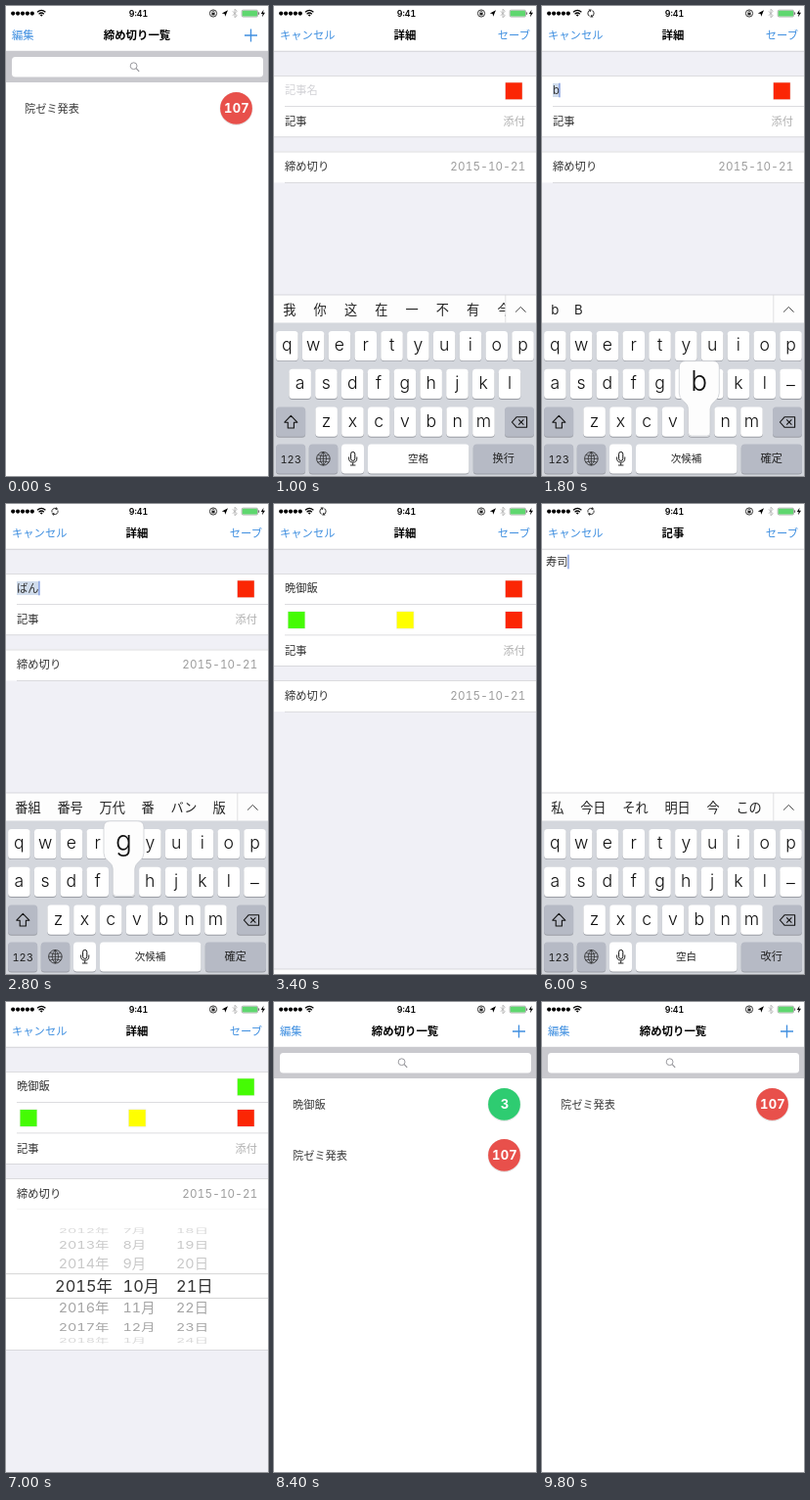
These frames come from a looping animation (268x480 px, 10000 ms). An HTML page:

```html
<!DOCTYPE html>
<html lang="ja">
<head>
<meta charset="utf-8">
<title>締め切り一覧</title>
<style>
  html, body { margin: 0; height: 100%; overflow: hidden; background: #fff; }
  svg { display: block; width: 100vw; height: 100vh; }
  svg svg { width: auto; height: auto; }
  text {
    font-family: Inter, "Noto Sans CJK JP", "Noto Sans CJK", sans-serif;
    font-variant-numeric: tabular-nums;
    white-space: pre;
  }
</style>
</head>
<body>
<svg id="stage" viewBox="0 0 268 480"></svg>
<script>
const LOOP = 10000, STEP = 200;
const BLUE = '#3f8fe0', LINE = '#d4d4d8', PAPER = '#f0f0f6', INK = '#333';
const RED = '#fb2604', GREEN = '#45fb04', YELLOW = '#ffff00';

// Drawing helpers
const text = (x, y, s, size = 11.3, fill = INK, more = '') =>
  `<text x="${x}" y="${y}" font-size="${size}" fill="${fill}" ${more}>${s}</text>`;
const MID = 'text-anchor="middle"', END = 'text-anchor="end"';
const BOLD = 'font-weight="700"', LIGHT = 'font-weight="300"';
const rect = (x, y, w, h, fill, r = 0) =>
  `<rect x="${x}" y="${y}" width="${w}" height="${h}" fill="${fill}" rx="${r}"/>`;
const circle = (x, y, r, fill, more = '') => `<circle cx="${x}" cy="${y}" r="${r}" fill="${fill}" ${more}/>`;
const stroke = (d, color, width = 1, more = '') =>
  `<path d="${d}" fill="none" stroke="${color}" stroke-width="${width}" ${more}/>`;
const fill = (d, color) => `<path d="${d}" fill="${color}"/>`;
const rule = (y, x = 0) => rect(x, y, 268 - x, 0.8, LINE);
const shift = (x, y, body) => `<g transform="translate(${x} ${y})">${body}</g>`;
const clip = (id, w, h, body) =>
  `<clipPath id="${id}">${rect(0, 0, w, h, '#000')}</clipPath><g clip-path="url(#${id})">${body}</g>`;

function statusBar(t) {
  let s = '';
  for (let i = 0; i < 5; i++) s += circle(7.2 + 4.9 * i, 7.6, 2.1, '#000');
  s += stroke('M32 6.3Q36.2 2.6 40.4 6.3M33.6 8.2Q36.2 5.8 38.8 8.2', '#000', 1.2);
  s += fill('M34.8 9.2Q36.2 8 37.6 9.2L36.2 10.8Z', '#000');
  if ((t >= 1200 && t < 6600) || (t >= 8800 && t < 9800)) {
    s += `<g transform="translate(50 7.5) rotate(${t / STEP * 45 + 90})">` +
      stroke('M-3 1A3.2 3.2 0 0 1 1.5-2.8M3-1A3.2 3.2 0 0 1-1.5 2.8', '#333') +
      fill('M1-4.5L3.4-2.3L.6-1.2ZM-1 4.5L-3.4 2.3L-.6 1.2Z', '#333') + '</g>';
  }
  s += text(135.5, 10.9, '9:41', 8.8, '#000', MID + ' font-weight="600"');
  s += circle(212, 7.5, 3.6, 'none', 'stroke="#222" stroke-width=".9"') + rect(210.4, 7, 3.2, 2.4, '#222');
  s += stroke('M211 7V6a1 1 0 0 1 2 0V7', '#222', 0.7);
  s += fill('M227 4.3L224.2 10.8L223.6 8L220.8 7.5Z', '#000');
  s += stroke('M231.8 5.3L236.2 9.8L234 11.8V3.2L236.2 5.3L231.8 9.8', '#aaa', 0.8);
  s += `<rect x="241.2" y="4.2" width="16.3" height="6.8" rx="1.3" fill="#fff" stroke="#777" stroke-width=".6"/>`;
  s += rect(241.7, 4.7, 15.3, 5.8, '#5fd76f', 0.8) + rect(258.2, 6.4, 0.9, 2.4, '#555');
  return s + fill('M263.5 3.8L260.8 8H262.6L262 11.3L265 6.8H263Z', '#000');
}

const navBar = (title, left, right) =>
  rect(0, 0, 268, 46, '#fff') + rect(0, 45.8, 268, 0.7, '#c6c6ca') +
  text(6, 34.4, left, 11.3, BLUE) + text(134, 34.4, title, 11.4, '#000', MID + ' ' + BOLD) +
  (right ? text(262, 34.4, right, 11.3, BLUE, END) : stroke('M244 30H257M250.5 23.5V36.5', BLUE, 1.3));

// List screen: each row can show a delete knob and slide aside
const OLD = { name: '院ゼミ発表', days: 107, color: '#e8504b' };
const NEW = { name: '晩御飯', days: 3, color: '#2ecc71' };

function listRow({ name, days, color }, y, editing, swipe) {
  const indent = editing ? 27 : 0;
  let s = text(19 + indent, 109, name, 11.2, '#3c3c3c') +
    circle(235.5, 105, 17, '#00000018') + circle(235.5, 104.4, 16.4, color) +
    text(236, 109.1, days, 13, '#fff', MID + ' letter-spacing=".3" ' + BOLD);
  if (editing) s += circle(18.5, 104.4, 8, '#ff3b30') + rect(14, 103.7, 9, 1.4, '#fff');
  if (swipe) s += rect(268, 78, 53, 52, '#ff3b30') + text(294.5, 108.5, '削除', 11.4, '#fff', MID);
  return shift(-swipe, y, s);
}

function list(items, { editing = false, swipe = 0, offset = 0 } = {}) {
  let s = rect(0, 0, 268, 480, '#fff');
  items.forEach((item, i) => { s += listRow(item, 52 * i + offset, editing, i ? 0 : swipe); });
  return s + navBar('締め切り一覧', editing ? '完了' : '編集') +
    rect(0, 46, 268, 32, '#c9c9ce') + rect(6, 52, 257, 20.4, '#fff', 3.5) +
    circle(130.6, 61.2, 3.4, 'none', 'stroke="#8e8e93" stroke-width=".9"') +
    stroke('M133.1 63.7L136.2 66.8', '#8e8e93', 1.1);
}

// Text with an inline conversion highlight and caret
const textWidth = (s, wide, narrow) => [...s].reduce((sum, c) => sum + (c <= 'z' ? narrow : wide), 0);

function field(x, y, value, composing, caret = true) {
  const w = textWidth(value, 11.2, 6.4);
  return (composing && w ? rect(x, y - 11, w, 14, '#d0dcec') : '') + text(x, y, value, 11.2) +
    (caret ? rect(x + w, y - 11.3, 1.1, 14.6, '#5a7fd6') : '');
}

const swatch = (x, y, color) => rect(x - 0.6, y - 0.6, 18.2, 18.2, '#ececec') + rect(x, y, 17, 17, color);

function picker(day, height = 143) {
  const columns = [
    [79.5, 2015, MID, v => v + '年'],
    [119.5, 10, '', v => (v + 11) % 12 + 1 + '月'],
    [174, day, '', v => v + '日'],
  ];
  let s = rect(0, 212, 268, 143, '#fff');
  for (const [x, value, anchor, label] of columns) {
    const base = Math.round(value);
    for (let k = -3; k <= 3; k++) {
      const slot = base + k - value, angle = slot * 0.367, near = Math.abs(slot) < 0.5;
      const shade = near ? '#333' : Math.abs(slot) > 2.5 ? '#d8d8d8' : slot < 0 ? '#c8c8c8' : '#a4a4a4';
      const y = 290 + 62.8 * Math.sin(angle);
      s += `<g transform="translate(${x} ${y}) scale(1 ${Math.cos(angle)})">` +
        text(0, near ? 6 : 5, label(base + k), near ? 16.4 : 14.4, shade, anchor) + '</g>';
    }
  }
  s += rect(0, 277.4, 268, 0.7, '#c4c4c4') + rect(0, 302, 268, 0.7, '#c4c4c4');
  return clip('wheel', 268, 212 + height, s) + rule(212 + height);
}

function detail({ name = '', composing = false, caret = false, palette = false, color = RED,
                  day = 21, pick = 0, active = false } = {}) {
  const d = palette ? 31.6 : 0;
  let s = rect(0, 0, 268, 480, PAPER) + navBar('詳細', 'キャンセル', 'セーブ') +
    rect(0, 71, 268, 62.5 + d, '#fff') + rect(0, 148.6 + d, 268, 31.8, '#fff');
  if (active) s += rect(0, 102 + d, 268, 31.5, '#d9d9d9');
  s += rule(71) + rule(102, 11) + rule(133.4 + d) + rule(148.6 + d) + rule(180.2 + d, 11);
  s += name ? field(11, 90, name, composing, caret) : text(11, 90, '記事名', 11.2, '#d2d2d6');
  s += swatch(236.8, 78.3, color);
  if (palette) {
    s += rule(133.5, 11) + swatch(14.5, 110, GREEN) + swatch(125.7, 110, YELLOW) + swatch(236.8, 110, RED);
  }
  s += text(11, 122.4 + d, '記事') + text(257, 122.4 + d, '添付', 11.2, '#b0b0b0', END);
  s += text(11, 168.4 + d, '締め切り');
  s += text(257.5, 168.4 + d, '2015-10-' + Math.round(day), 11.6, '#9c9c9c', END + ' letter-spacing=".2"');
  return s + (pick ? picker(day, pick) : '');
}

const editor = (value, composing) =>
  rect(0, 0, 268, 480, '#fff') + navBar('記事', 'キャンセル', 'セーブ') + field(4, 63, value, composing);

// Keyboard
const DARK = '#b6bac5';
const keyBox = (x, y, w, color = '#fff') => rect(x, y + 0.9, w, 30.2, '#9a9da4', 3.5) + rect(x, y, w, 30.2, color, 3.5);

function popup(x, y, letter) {
  const c = x + 11.2;
  const d = `M${c - 14} ${y - 47}h28q6.5 0 6.5 6.5v26q0 5-4.5 8.5t-4.8 8v24q0 3.5-3.5 3.5h-15.4` +
    `q-3.5 0-3.5-3.5v-24q0-4.5-4.8-8t-4.5-8.5v-26q0-6.5 6.5-6.5z`;
  return `<path d="${d}" fill="#fdfdfd" stroke="#c4c7cd" stroke-width=".7"/>` +
    text(c, y - 16.5, letter, 28, '#111', MID + ' ' + LIGHT);
}

function keyboard(mode, hints, pressed = '') {
  const chinese = mode === 'zh';
  const [space, enter] = { zh: ['空格', '换行'], ja: ['空白', '改行'], conv: ['次候補', '確定'] }[mode];
  let s = rect(0, 295, 268, 29, '#fdfdfd') + rect(0, 294.6, 268, 0.8, '#cfd0d4') + rect(0, 323.5, 268, 157, '#d4d7dd');
  let x = 9.3, words = '', bubble = '';
  for (const word of hints.split(' ')) {
    words += text(x, 314.6, word, 13.2, '#222');
    x += (chinese ? 18.1 : 16.7) + textWidth(word, 13.2, 7);
  }
  s += clip('hints', 236.5, 480, words);
  if (hints) s += rect(236.5, 295, 0.7, 28.5, LINE);
  s += stroke('M247 312.6L252.3 307.4L257.6 312.6', '#444', 1);

  const rows = [['qwertyuiop', 2.1, 332], ['asdfghjkl' + (chinese ? '' : '–'), chinese ? 15.4 : 2.1, 370.8],
                ['zxcvbnm', 42.4, 409.6]];
  for (const [letters, left, y] of rows) {
    [...letters].forEach((c, i) => {
      const kx = left + 26.8 * i;
      s += keyBox(kx, y, 22.5) + text(kx + 11.2, y + (c === '–' ? 22 : 20.2), c, 17.6, '#111', MID + ' ' + LIGHT);
      if (c === pressed) bubble = popup(kx, y, c);
    });
  }
  const erase = pressed === 'delete';
  s += keyBox(2.1, 409.6, 30, DARK) + keyBox(236, 409.6, 30, erase ? '#fff' : DARK);
  s += stroke('M17.3 418.3L10.8 425.2H14.2V431H20.4V425.2H23.8Z', '#111', 1.1, 'stroke-linejoin="round"');
  s += `<path d="M243.4 425L248 419.8H258.6V430.2H248Z" fill="${erase ? '#000' : 'none'}" stroke="#111" stroke-width="1.1" stroke-linejoin="round"/>`;
  s += stroke('M250.2 422.4L255.4 427.6M255.4 422.4L250.2 427.6', erase ? '#fff' : '#111', 1.1);

  s += keyBox(2.1, 447.4, 30, DARK) + text(17.1, 466.6, '123', 11, '#222', MID);
  s += keyBox(35.8, 447.4, 29.4, pressed === 'globe' ? '#fff' : DARK) + circle(50.4, 462.3, 6.8, 'none', 'stroke="#222" stroke-width=".8"');
  s += stroke('M50.4 455.5V469.1M43.6 462.3H57.2M44.8 458.6Q50.4 461 56 458.6M44.8 466Q50.4 463.6 56 466M50.4 455.5Q43.8 462.3 50.4 469.1Q57 462.3 50.4 455.5', '#222', 0.7);
  s += keyBox(69, 447.4, 23) + `<rect x="78.6" y="455.4" width="4.2" height="9" rx="2.1" fill="none" stroke="#111"/>`;
  s += stroke('M76.6 460.5V462A4.1 4.1 0 0 0 84.8 462V460.5M80.7 466.2V469M78 469H83.4', '#111', 0.9);
  s += keyBox(96, 447.4, 103.4) + text(147.6, 466.2, space, 10.5, '#222', MID);
  s += keyBox(203.8, 447.4, 62.2, DARK) + text(234.8, 466.4, enter, 11.2, '#222', MID);
  return s + bubble;
}

// Timeline: start time in ms, picture
const ZH = '我 你 这 在 一 不 有 今', JA = '私 今日 それ 明日 今 この 何';
const BAN = '番組 番号 万代 番 バン 版', SU = 'スダモリ 寿司 裾 進め スs す';
const SUSHI = '寿司 すし スシ 鮨 すしを', DINNER = '晩御飯 晩ご飯 番号 万国 番号順';
const naming = (name, hints, pressed) =>
  detail({ name, composing: true, caret: true }) + keyboard('conv', hints, pressed);
const writing = (value, hints, pressed) => editor(value, true) + keyboard('conv', hints, pressed);
const dinner = more => detail({ name: '晩御飯', palette: true, ...more });
const dating = (day, pick = 143) => dinner({ color: GREEN, day, pick });

const scenes = [
  [0, () => list([OLD])],
  [400, () => list([OLD]) + shift(0, 190, detail())],
  [600, () => list([OLD]) + shift(0, 14, detail()) + shift(0, 70, keyboard('zh', ZH))],
  [800, () => detail() + keyboard('zh', ZH)],
  [1400, () => detail() + keyboard('zh', ZH, 'globe')],
  [1600, () => detail() + keyboard('ja', JA)],
  [1800, () => naming('b', 'b B', 'b')],
  [2000, () => naming('ば', '場合 場所 バス 場 ばかり', 'a')],
  [2200, () => naming('ばn', BAN, 'n')],
  [2400, () => naming('ばん', BAN, 'n')],
  [2600, () => naming('ばん', BAN)],
  [2800, () => naming('ばん', BAN, 'g')],
  [3000, () => naming('ばんご', DINNER, 'o')],
  [3200, () => detail({ name: '晩御飯', caret: true }) + keyboard('ja', JA)],
  [3400, () => dinner() + shift(0, 180, keyboard('ja', ''))],
  [3600, () => dinner()],
  [3800, () => dinner({ active: true })],
  [4000, () => shift(-50, 0, dinner({ active: true })) + shift(90, 0, editor(''))],
  [4200, () => editor('') + keyboard('ja', JA)],
  [4400, () => writing('s', 's S', 's')],
  [4600, () => writing('すs', SU, 's')],
  [4800, () => writing('す', SU, 'delete')],
  [5000, () => writing('す', SU)],
  [5200, () => writing('すs', SU, 's')],
  [5400, () => writing('すし', SUSHI, 'i')],
  [5600, () => writing('すし', SUSHI)],
  [5800, () => editor('寿司') + keyboard('ja', JA)],
  [6200, () => shift(-30, 0, dinner()) + shift(150, 0, editor('寿司'))],
  [6400, () => dinner()],
  [6600, () => dinner({ color: GREEN })],
  [6800, () => dating(21, 100)],
  [7000, () => dating(21)],
  [7400, () => dating(21.4)],
  [7600, () => dating(22.6)],
  [7800, () => dating(23.7)],
  [8000, () => dating(24)],
  [8400, () => list([NEW, OLD])],
  [8800, () => list([NEW, OLD], { editing: true })],
  [9000, () => list([NEW, OLD], { editing: true, swipe: 53 })],
  [9400, () => list([OLD], { editing: true, offset: 18 })],
  [9600, () => list([OLD], { editing: true })],
  [9800, () => list([OLD])],
];

const stage = document.getElementById('stage');
const start = performance.now();
let shown = -1;

function tick() {
  const t = Math.floor(Math.max(0, performance.now() - start) % LOOP / STEP) * STEP;
  if (t !== shown) {
    shown = t;
    stage.innerHTML = scenes.findLast(([from]) => from <= t)[1]() + statusBar(t);
  }
  requestAnimationFrame(tick);
}
tick();
</script>
</body>
</html>
```
